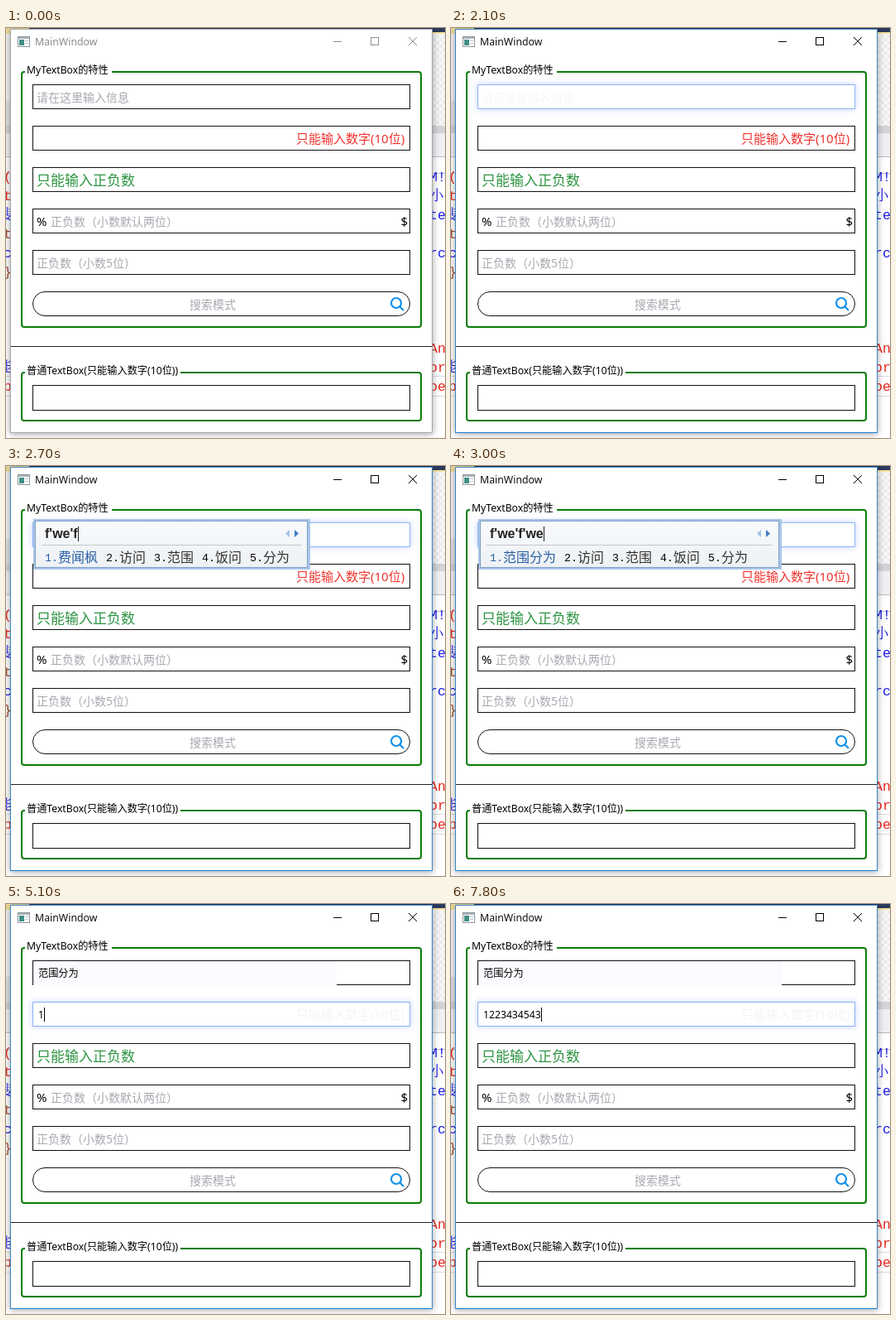
Recreate the animation shown at these times as an HTML page. Size 531x495 px, loop 8 s.

```html
<!DOCTYPE html>
<html lang="zh">
<head>
<meta charset="utf-8">
<title>MainWindow</title>
<style>
  html, body { margin: 0; width: 100%; height: 100%; overflow: hidden; background: #fff; }
  svg { display: block; width: 531px; height: 495px; }
  text { font: 14px "Noto Sans", "Noto Sans CJK SC", "Noto Sans CJK", sans-serif; white-space: pre; }
  .code text { font: 16.5px "Liberation Mono", "Noto Serif CJK SC", "Noto Sans CJK SC", monospace; }
  .blue { fill: #1c1ce8; }
  .red { fill: #e8241c; }
  .brown { fill: #a04a2a; }
  .win { fill: #fff; filter: drop-shadow(0 1px 4px rgba(0, 0, 0, .38)); }
  .frame { fill: none; stroke: #a5a8aa; }
  .title { font-size: 12.3px; fill: #8c8c8c; }
  .buttons { fill: none; stroke: #8f8f8f; }
  .active .frame { stroke: #3d87c4; }
  .active .title { fill: #111; }
  .active .buttons { stroke: #000; }
  .edge { stroke: #1482d8; visibility: hidden; }
  .active .edge { visibility: visible; }
  .group { fill: none; stroke: #0a7d0a; stroke-width: 2; }
  .head, .typed { font-size: 12.2px; fill: #000; }
  .field { fill: #fff; stroke: #111; }
  .field.half { stroke: #5b708f; }
  .field.focus { stroke: #8db3f0; filter: drop-shadow(0 0 4px rgba(70, 120, 255, .32)); }
  .hint { fill: #a6a9b0; }
  .caret { stroke: #000; }
  .ime .keys { font: bold 16px "Liberation Sans", Arial, sans-serif; fill: #222; }
  .ime .words { font: 16px "Noto Sans CJK SC", "Noto Sans CJK", sans-serif; fill: #333; }
  .ime .num { font: 13.33px "Liberation Mono", monospace; }
  .ime .first { fill: #2c5fa6; }
</style>
</head>
<body>
<svg id="stage" viewBox="0 0 531 495">
  <defs>
    <pattern id="checker" width="8" height="8" patternUnits="userSpaceOnUse">
      <path d="M0 0h8v8h-8z" fill="#f7f7f7"/>
      <path d="M0 0h4v4h-4zM4 4h4v4h-4z" fill="#ececec"/>
    </pattern>
    <linearGradient id="panel" x2="0" y2="1">
      <stop stop-color="#f8fafc"/>
      <stop offset="1" stop-color="#eef1f4"/>
    </linearGradient>
  </defs>

  <!-- desktop behind the window -->
  <rect width="531" height="495" fill="#fff"/>
  <rect width="531" height="118" fill="url(#checker)"/>
  <rect width="6" height="118" fill="#f1f3f6"/>
  <rect y="88" width="6" height="30" fill="#dfe2e6"/>
  <rect y="118" width="531" height="9" fill="#d2d4d8"/>
  <rect y="127" width="531" height="28" fill="#eff0f3"/>
  <path d="M0 155.5h531M0 175.5h531" stroke="#b9bcc4"/>
  <rect width="531" height="6" fill="#2c3a5c"/>
  <rect y="5" width="531" height="2" fill="#f5e3a0"/>
  <rect width="28" height="6" fill="#e9d998"/>
  <path d="M510 420.5h21M510 444.5h21M0 420.5h6M0 444.5h6" stroke="#dcdce2"/>
  <g class="code" id="code"></g>

  <g id="window">
    <rect class="win" x="5" y="2" width="511" height="487"/>
    <path d="M36 1.5h72" stroke="#d5d9e4" stroke-dasharray="4 2 1 2 5 2"/>
    <rect class="frame" x="5.5" y="1.5" width="510" height="487"/>
    <path class="edge" d="M5 488.5h511"/>

    <rect x="14.5" y="10.5" width="14" height="12" fill="#fff" stroke="#8b959c"/>
    <rect x="15" y="11" width="13" height="2" fill="#aab4ba"/>
    <rect x="16" y="14" width="6" height="7" fill="#3f8f86"/>
    <path d="M23 15.5h4M23 18.5h4" stroke="#b9c3c8"/>
    <text class="title" x="35" y="21">MainWindow</text>
    <g class="buttons">
      <path d="M396 16.5h10"/>
      <rect x="441.5" y="11.5" width="9" height="9"/>
      <path d="M487 11l10 10M497 11l-10 10"/>
    </g>

    <path class="group" d="M23 53h-1q-3 0 -3 3v302q0 3 3 3h477q3 0 3 -3v-302q0 -3 -3 -3h-371"/>
    <text class="head" x="25" y="55">MyTextBox的特性</text>
    <path d="M6 384.5h509" stroke="#222"/>
    <path class="group" d="M23 416h-1q-3 0 -3 3v52q0 3 3 3h477q3 0 3 -3v-52q0 -3 -3 -3h-288"/>
    <text class="head" x="25" y="418">普通TextBox(只能输入数字(10位))</text>

    <rect class="field" x="32.5" y="168.5" width="456" height="29"/>
    <rect class="field" x="32.5" y="218.5" width="456" height="29"/>
    <rect class="field" x="32.5" y="268.5" width="456" height="29"/>
    <rect class="field" x="32.5" y="318.5" width="456" height="29" rx="14.5"/>
    <rect class="field" x="32.5" y="431.5" width="456" height="30"/>
    <rect class="field" id="box1" x="32.5" y="68.5" width="456" height="29"/>
    <rect class="field" id="box2" x="32.5" y="118.5" width="456" height="29"/>
    <rect id="tint" x="33" y="69" width="367" height="29" fill="#f9fbff"/>

    <text class="hint" id="hint1" x="37" y="89">请在这里输入信息</text>
    <text id="hint2" x="351" y="139" style="font-size:15px" fill="#f0322d">只能输入数字(10位)</text>
    <text x="37" y="190" style="font-size:17px" fill="#2c9442">只能输入正负数</text>
    <text x="37" y="239" style="font-size:15px">%</text>
    <text class="hint" x="54" y="239">正负数（小数默认两位）</text>
    <text x="477.5" y="239" style="font-size:15px">$</text>
    <text class="hint" x="37" y="289">正负数（小数5位）</text>
    <text class="hint" x="222" y="339">搜索模式</text>
    <g fill="none" stroke="#118fea" stroke-width="2.2">
      <circle cx="472" cy="332" r="6"/>
      <path d="M476.5 336.5l4.5 4.5"/>
    </g>

    <text class="typed" id="text1" x="39" y="88">范围分为</text>
    <text class="typed" id="text2" x="39" y="138"></text>
    <path class="caret" id="caret"/>
  </g>

  <g class="ime" id="ime">
    <rect id="outer" x="33.5" y="64.5" height="60" fill="#a9c8ea" stroke="#8fb2da" stroke-opacity=".6"/>
    <rect id="inner" x="35.5" y="66.5" height="56" fill="url(#panel)" stroke="#7f9fc4"/>
    <path id="rule" stroke="#c3c7cc"/>
    <path id="prev" fill="#a4c2e4"/>
    <path id="next" fill="#3f7fc4"/>
    <text class="keys" id="keys" x="47" y="87"></text>
    <path id="imeCaret" stroke="#222"/>
    <g id="words"></g>
  </g>
</svg>
<script>
const LOOP = 8000;
const NS = "http://www.w3.org/2000/svg";
const $ = id => document.getElementById(id);
const show = (el, on) => { el.style.visibility = on ? "visible" : "hidden"; };

function addText(parent, x, y, cls, str) {
  const el = document.createElementNS(NS, "text");
  el.setAttribute("x", x);
  el.setAttribute("y", y);
  el.setAttribute("class", cls);
  el.textContent = str;
  parent.append(el);
}

// Editor lines: row, left piece, its colour, right piece, its colour
[
  [0, "(", "red", "M!", "blue"], [1, "t", "red", "小", "blue"],
  [2, "搜", "blue", "te", "blue"], [3, "t", "brown", "", ""],
  [4, "c", "blue", "rc", "blue"], [5, "}", "brown", "", ""],
  [9, "、", "blue", "An", "red"], [10, "能", "blue", "or", "red"],
  [11, "p", "red", "oe", "red"]
].forEach(([row, l, lc, r, rc]) => {
  const y = 185 + row * 23;
  addText($("code"), l > "~" ? -9 : -3, y, lc, l);
  addText($("code"), r > "~" ? 513 : 512, y, rc, r);
});

// Input method panel: start, right edge, keys, candidates
const PANELS = [
  [2500, 288, "f", ["分", "发", "放", "飞", "方"]],
  [2600, 352, "f'w", ["服务", "访问", "范围", "饭问", "分为"]],
  [2700, 368, "f'we'f", ["费闻枫", "访问", "范围", "饭问", "分为"]],
  [2900, 400, "f'we'f'w", ["范围分为", "访问", "范围", "饭问", "分为"]],
  [3000, 400, "f'we'f'we", ["范围分为", "访问", "范围", "饭问", "分为"]]
];
// Typed digits: start, length
const DIGITS = "1223434543";
const TYPING = [[4900, 0], [5100, 1], [5300, 2], [5600, 3], [5800, 4], [6300, 5],
  [6400, 6], [6600, 7], [6700, 8], [6800, 10]];
// Caret visible from, to
const BLINKS = [[500, 1100], [1600, 2100], [3100, 3500], [4000, 4500], [4900, 7400], [7800, LOOP]];

const latest = (list, t) => list.filter(e => e[0] <= t).pop();
let panelNow = null;

function drawPanel(panel) {
  show($("ime"), !!panel);
  if (!panel || panel === panelNow) return;
  panelNow = panel;
  const [, right, keys, list] = panel;
  $("outer").setAttribute("width", right - 34);
  $("inner").setAttribute("width", right - 39);
  $("rule").setAttribute("d", `M43 95.5H${right - 11}`);
  $("prev").setAttribute("d", `M${right - 25} 77v9l-5 -4.5z`);
  $("next").setAttribute("d", `M${right - 19} 77v9l5 -4.5z`);
  $("keys").textContent = keys;
  const end = Math.round(47 + $("keys").getComputedTextLength()) + .5;
  $("imeCaret").setAttribute("d", `M${end} 73v18`);
  $("words").replaceChildren();
  let x = 47;
  list.forEach((word, i) => {
    const cls = i ? "" : " first";
    if (x + 16 + word.length * 16 > right - 8) return;
    addText($("words"), x, 115, "num" + cls, i + 1 + ".");
    addText($("words"), x + 16, 116, "words" + cls, word);
    x += 26 + word.length * 16;
  });
}

function draw(t) {
  const second = t >= 4900;
  $("window").classList.toggle("active", t >= 500);
  $("box1").setAttribute("class", "field" + (t < 500 || second ? "" : t < 600 ? " half" : " focus"));
  $("box2").setAttribute("class", "field" + (second ? " focus" : ""));
  $("hint1").style.opacity = t < 500 ? 1 : t < 600 ? .45 : .1;
  show($("hint1"), t < 2500);
  $("hint2").style.opacity = second ? .07 : 1;
  $("hint2").style.fill = second ? "#5a6a9a" : "";
  show($("tint"), t >= 3100);
  show($("text1"), t >= 3100);

  const count = second ? latest(TYPING, t)[1] : 0;
  $("text2").textContent = DIGITS.slice(0, count);
  const x = second ? 39.5 + 7 * count : t < 3100 ? 39.5 : 87.5;
  $("caret").setAttribute("d", `M${x} ${second ? 125 : 75}v17`);
  show($("caret"), BLINKS.some(([a, b]) => t >= a && t < b));

  drawPanel(t < 3100 ? latest(PANELS, t) : null);
}

const start = performance.now();
function tick(now) {
  draw(Math.max(0, now - start) % LOOP);
  requestAnimationFrame(tick);
}
draw(0);
requestAnimationFrame(tick);
</script>
</body>
</html>
```
